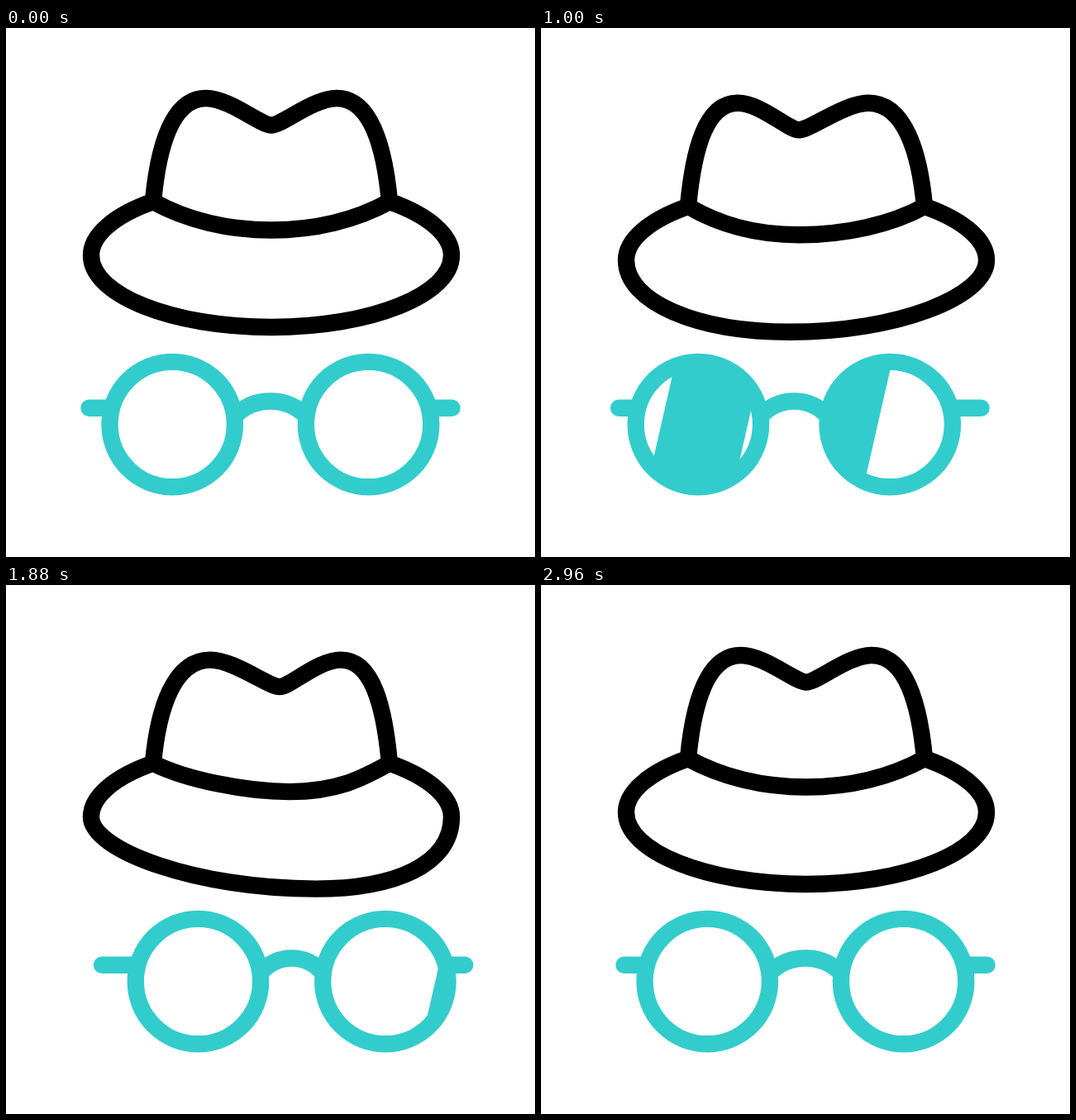
Write an HTML page with a canvas that moves like this. It is 640 by 640 pixels and loops after 3 s.

```html
<!DOCTYPE html>
<html>
<head>
<meta charset="utf-8">
<style>
html, body { margin: 0; height: 100%; overflow: hidden; background: #fff; }
canvas { display: block; }
</style>
</head>
<body>
<canvas id="stage" width="640" height="640"></canvas>
<script>
const ctx = document.getElementById('stage').getContext('2d');
const LOOP = 3000, TEAL = '#33cccc', LENS_Y = 479.6;

// Head turn: [time, amount], negative is left.
const TURN = [[0, 0], [100, 0], [600, -1], [780, -1], [1550, 1.16], [1787, 1.16], [2170, 0], [LOOP, 0]];

const ease = x => (1 - Math.cos(Math.PI * x)) / 2;

function turnAt(t) {
  const i = TURN.findIndex(k => k[0] > t);
  const [t0, a] = TURN[i - 1], [t1, b] = TURN[i];
  return a + (b - a) * ease((t - t0) / (t1 - t0));
}

function bobAt(t) {
  if (t < 1500) return 6.7 * Math.sin(Math.PI * t / LOOP);
  return 6.7 * (1 - ease(Math.min(1, (t - 1500) / 1430)));
}

function stroke(d, color, cap = 'butt') {
  ctx.strokeStyle = color;
  ctx.lineWidth = 20.4;
  ctx.lineCap = cap;
  ctx.stroke(new Path2D(d));
}

function drawHat(shift, bob) {
  const peak = shift(-7, 5.3), dip = 321 + shift(-15, 10);
  const band = 321 + shift(-15, 22), base = 321 + shift(-34, 54);
  const lx = 242 + peak, rx = 400 + peak;
  ctx.save();
  ctx.translate(0, bob);
  stroke(`M178 210 C184 145 ${200 + peak / 2} 85 ${lx} 85
    C${lx + 28} 85 ${dip - 13} 117.5 ${dip} 117.5
    C${dip + 13} 117.5 ${rx - 28} 85 ${rx} 85
    C${442 + peak / 2} 85 458 145 464 210`, '#000');
  stroke(`M178 210 C132 226 103 250 103 275
    C103 ${323 + shift(5, -8)} ${201 + shift(-21, 29)} 362 ${base} 362
    C${441 + shift(-18, 29)} 362 539 ${323 + shift(-6, 10)} 539 275
    C539 250 510 226 464 210
    C${424 + shift(0, 6)} ${232 + shift(0, -3)} ${374 + shift(-9, 26)} 244.5 ${band} 244.5
    C${268 + shift(-18, 22)} 244.5 ${218 + shift(-4, 0)} ${232 + shift(0, -2)} 178 210 Z`, '#000');
  ctx.restore();
}

// Slanted bar between two x positions measured at lens height.
function bar(x0, x1) {
  const lean = 90 * 0.228, top = LENS_Y - 90, bottom = LENS_Y + 90;
  ctx.beginPath();
  ctx.moveTo(x0 + lean, top);
  ctx.lineTo(x1 + lean, top);
  ctx.lineTo(x1 - lean, bottom);
  ctx.lineTo(x0 - lean, bottom);
  ctx.fill();
}

function drawGlasses(shift, t) {
  const left = 201.2 + shift(-18.4, 31.4), right = 438.6 + shift(-27.8, 20.4);
  const lenses = [left, right];

  ctx.save();
  ctx.beginPath();
  for (const x of lenses) {
    ctx.moveTo(x + 70, LENS_Y);
    ctx.arc(x, LENS_Y, 70, 0, 7);
  }
  ctx.clip();
  ctx.fillStyle = TEAL;
  const wide = time => 247 + 280 * Math.tanh((time - 1134) / 350);
  const slim = time => 250 + 300 * Math.tanh((time - 758) / 417);
  bar(wide(t), wide(t + 132) + 4);
  bar(slim(t - 128), slim(t));
  ctx.restore();

  for (const x of lenses) {
    ctx.strokeStyle = TEAL;
    ctx.lineWidth = 20.4;
    ctx.beginPath();
    ctx.arc(x, LENS_Y, 75.7, 0, 7);
    ctx.stroke();
  }
  const x0 = left + 75, x1 = right - 75, pull = (x1 - x0) * 0.274;
  stroke(`M${x0} 470 C${x0 + pull} 445.4 ${x1 - pull} 445.4 ${x1} 470`, TEAL);
  stroke(`M${100.5 + shift(-10.9, 15.6)} 459.7 H${left - 75}`, TEAL, 'round');
  stroke(`M${539.5 + shift(-11.9, 15.8)} 459.7 H${right + 75}`, TEAL, 'round');
}

function frame(now) {
  const t = now % LOOP, turn = turnAt(t);
  const shift = (toLeft, toRight) => turn < 0 ? -turn * toLeft : turn * toRight;
  ctx.fillStyle = '#fff';
  ctx.fillRect(0, 0, 640, 640);
  drawHat(shift, bobAt(t));
  drawGlasses(shift, t);
  requestAnimationFrame(() => frame(performance.now()));
}
frame(performance.now());
</script>
</body>
</html>
```
